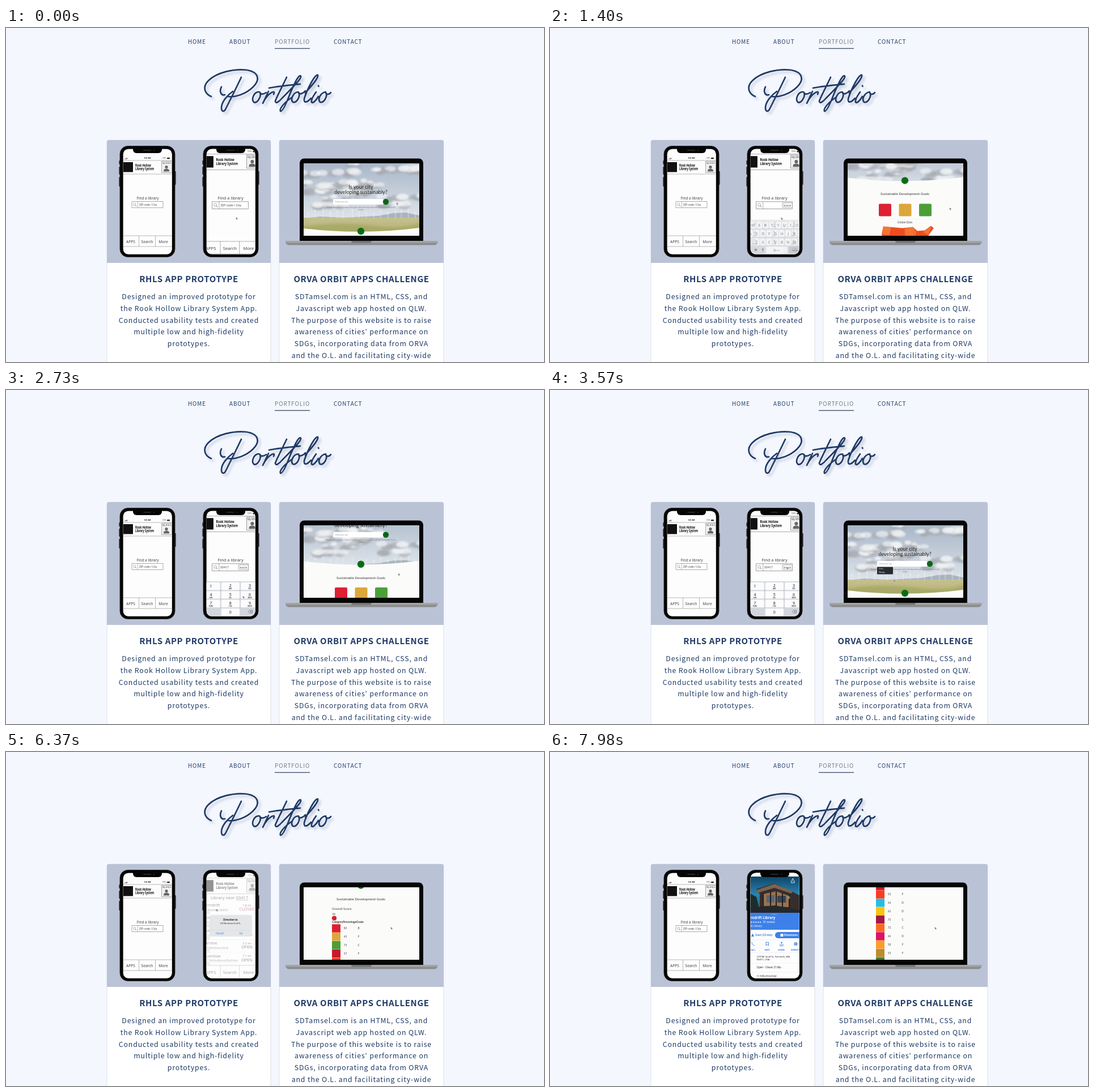
Write an HTML page with a canvas that moves like this. It is 949x590 px and loops after 8000 ms.

```html
<!DOCTYPE html>
<html lang="en">
<head>
<meta charset="utf-8">
<title>Portfolio</title>
<style>
html, body { margin: 0; width: 100%; height: 100%; overflow: hidden; background: #f4f7fe; }
canvas { display: block; }
</style>
</head>
<body>
<canvas id="stage" width="949" height="590"></canvas>
<script>
const LOOP = 8000, STEP = 70;
const NAVY = '#1f3a66', PANEL = '#bac3d6', BLUE = '#3d80ea';
const SOURCE = '"Noto Sans CJK JP", "Noto Sans CJK SC", "Noto Sans CJK", "Open Sans", sans-serif';
const NOTO = '"Noto Sans", sans-serif', LATO = 'Lato, sans-serif';
const ZIP = '00417';
const ctx = document.getElementById('stage').getContext('2d');

const ramp = (t, a, b) => Math.min(1, Math.max(0, (t - a) / (b - a)));

// Linear interpolation through [time, ...values] points.
function track(points, t) {
  let i = 1;
  while (i < points.length - 1 && points[i][0] < t) i++;
  const a = points[i - 1], b = points[i], k = ramp(t, a[0], b[0]);
  return a.slice(1).map((v, j) => v + (b[j + 1] - v) * k);
}

// Draws a line of text and returns its natural width.
function text(s, x, y, size, { color = '#444', align = 'center', weight = 400, font = NOTO, spacing = 0 } = {}) {
  ctx.font = `${weight} ${size}px ${font}`;
  ctx.letterSpacing = spacing + 'px';
  ctx.textAlign = align;
  ctx.fillStyle = color;
  ctx.fillText(s, x, y);
  return ctx.measureText(s).width;
}

function box(x, y, w, h, fill, radius = 0, stroke, width = 0.7) {
  ctx.beginPath();
  ctx.roundRect(x, y, w, h, radius);
  if (fill) { ctx.fillStyle = fill; ctx.fill(); }
  if (stroke) { ctx.strokeStyle = stroke; ctx.lineWidth = width; ctx.stroke(); }
}

function disc(x, y, r, fill) {
  ctx.beginPath();
  ctx.arc(x, y, r, 0, 7);
  ctx.fillStyle = fill;
  ctx.fill();
}

function shape(d, fill) {
  ctx.fillStyle = fill;
  ctx.fill(new Path2D(d));
}

function line(d, color = '#888', width = 0.6) {
  ctx.strokeStyle = color;
  ctx.lineWidth = width;
  ctx.stroke(new Path2D(d));
}

function group(draw, alpha = 1) {
  if (alpha <= 0) return;
  ctx.save();
  ctx.globalAlpha = alpha;
  draw();
  ctx.restore();
}

function pointer(x, y) {
  group(() => {
    ctx.translate(x, y);
    shape('M-1.5-2 L2.5 .8 L.8 1.2 L1.6 3 L.7 3.3 L0 1.6 L-1.2 2.4Z', '#777');
    line('M-1.5-2 L2.5 .8 L.8 1.2 L1.6 3 L.7 3.3 L0 1.6 L-1.2 2.4Z', '#fff', 0.3);
  });
}

/* ---------- page ---------- */

const SCRIPT = [
  'M362 121C350 116 346 104 357 93C372 78 402 72 423 74C446 77 449 91 436 104C424 116 405 123 391 121',
  'M415 87C407 104 396 126 388 142C385 149 380 148 380 141C380 131 390 119 400 112M380 104C376 112 379 120 386 118',
  'M447 113C438 112 432 125 437 131C443 134 451 121 448 114C449 118 455 117 459 114',
  'M463 112C459 120 456 127 453 133C457 124 464 115 471 113C474 112 473 115 472 117',
  'M495 87C487 104 478 121 475 129C475 135 482 130 487 124M464 106C480 103 500 101 519 99',
  'M487 124C502 108 522 90 520 85C516 81 508 100 501 116C495 132 488 148 484 147C482 143 490 132 505 122',
  'M516 113C507 113 501 126 506 131C513 133 520 120 516 114C518 118 524 116 528 111',
  'M528 115C538 103 552 88 550 83C546 80 531 108 526 125C525 134 532 131 538 124',
  'M547 113C542 120 538 128 539 131C541 134 547 128 551 121M551 102L551.5 103',
  'M564 113C555 114 549 126 554 131C561 133 568 120 564 114C565 118 570 118 573 114'
].join('');

function card(x, w, title, lines) {
  const mid = x + w / 2;
  box(x, 198, w, 420, '#fff', 4, '#dce0e9', 1);
  box(x, 198, w, 217, PANEL, [3, 3, 0, 0]);
  text(title, mid, 449, 15, { color: NAVY, weight: 600, font: SOURCE, spacing: 0.6 });
  lines.forEach((s, i) => text(s, mid, 479 + i * 20.8, 12.35, { color: NAVY, font: SOURCE, spacing: 0.85 }));
}

function page() {
  box(0, 0, 949, 590, '#f4f7fe');
  [['HOME', 321], ['ABOUT', 394], ['PORTFOLIO', 474], ['CONTACT', 578]].forEach(([s, x]) =>
    text(s, x, 28, 9.85, { align: 'left', color: s === 'PORTFOLIO' ? '#737b88' : NAVY, font: SOURCE, spacing: 0.95 }));
  box(474, 35.5, 62, 1.5, '#56617a');
  group(() => {
    ctx.lineCap = ctx.lineJoin = 'round';
    ctx.shadowColor = 'rgba(40,55,90,.22)';
    ctx.shadowBlur = 4;
    ctx.shadowOffsetX = ctx.shadowOffsetY = 4;
    line(SCRIPT, NAVY, 2.7);
  });
  card(178, 289, 'RHLS APP PROTOTYPE', [
    'Designed an improved prototype for', 'the Rook Hollow Library System App.',
    'Conducted usability tests and created', 'multiple low and high-fidelity', 'prototypes.']);
  card(482, 290, 'ORVA ORBIT APPS CHALLENGE', [
    'SDTamsel.com is an HTML, CSS, and', 'Javascript web app hosted on QLW.',
    'The purpose of this website is to raise', 'awareness of cities’ performance on',
    'SDGs, incorporating data from ORVA', 'and the O.L. and facilitating city-wide']);
}

/* ---------- phones ---------- */

function phone(x, screen) {
  [[234, 7], [245, 14], [263, 17]].forEach(([y, h]) => box(x - 1.6, y, 2.5, h, '#222', 1));
  box(x + 96, 253, 2.6, 24, '#222', 1);
  box(x, 208.5, 97, 196, '#050505', 14, '#222', 0.8);
  ctx.save();
  box(x + 5.8, 213.8, 85.8, 185.8, '#fdfdfd', 9);
  ctx.clip();
  screen();
  ctx.restore();
  box(x + 23, 210, 51, 11, '#050505', [0, 0, 6, 6]);
  box(x + 41, 215.3, 14, 1.5, '#333', 1);
  disc(x + 60, 216, 1, '#2c3444');
}

function personIcon(x, y) {
  disc(x, y, 2.6, '#666');
  shape(`M${x - 5} ${y + 8}V${y + 6}Q${x - 4} ${y + 3} ${x} ${y + 3}T${x + 5} ${y + 6}V${y + 8}Z`, '#666');
}

function condensed(s, x, y) {
  group(() => {
    ctx.translate(x, y);
    ctx.scale(0.72, 1);
    text(s, 0, 0, 6.2, { align: 'left', weight: 700, color: '#111' });
  });
}

function appFrame() {
  box(200, 215, 100, 190, '#fdfdfd');
  text('9:41 AM', 249.5, 231.3, 2.9, { weight: 700, color: '#222' });
  [0, 1, 2, 3].forEach(i => box(209 + i * 1.3, 231 - i * 0.6, 0.9, 0.7 + i * 0.6, '#333'));
  text('100%', 279, 231.2, 2.7);
  box(284, 229, 5, 2.2, '#222', 0.6);
  line('M200 234H300');
  box(207, 237, 17, 17.5, '#111');
  condensed('Rook Hollow', 228, 244.5);
  condensed('Library System', 228, 251);
  box(274.5, 235.5, 18, 20, '#f1f1f1', 0, '#888');
  text('My RHLS', 283.5, 240.3, 3.8);
  personIcon(283, 245.5);
  line('M200 258H300M200 367H300M200 386H300M234.5 367V386M263.5 367V386');
  [['APPS', 220], ['Search', 249], ['More', 277.5]].forEach(([s, x]) => text(s, x, 379.6, 6.6));
}

function appHome(placeholder = 1) {
  appFrame();
  text('Find a library', 250, 303, 6.4);
  box(222, 306.5, 55, 11, '#fff', 0, '#888');
  line('M232.5 306.5V317.5');
  ctx.beginPath();
  ctx.arc(226.7, 311.4, 2.1, 0, 7);
  ctx.stroke();
  line('M228.2 313L230.2 315', '#555', 0.8);
  group(() => text('ZIP code / City', 235, 313.9, 4.7, { align: 'left' }), placeholder);
}

const zoomed = draw => group(() => {
  ctx.translate(395.5, 225);
  ctx.scale(1.16, 1.16);
  ctx.translate(-249.5, -236);
  draw();
}, ctx.globalAlpha);

const KEY = { color: '#222' };

function letterKeys() {
  box(350, 340, 94, 62, '#d9dbdf');
  [['QWERTYUIOP', 347, 348], ['ASDFGHJKL', 353.5, 363], ['ZXCVBNM', 364.5, 378]].forEach(([keys, x, y]) =>
    [...keys].forEach((c, i) => {
      box(x + i * 11.1 - 4.6, y - 6, 9.3, 12, '#fcfcfc', 1.8);
      text(c, x + i * 11.1, y + 2.6, 7, KEY);
    }));
  box(382, 386, 37, 12, '#fcfcfc', 1.8);
  text('space', 400.5, 393.6, 3.8);
  disc(363, 392, 2.4, '#888');
  box(374.4, 389, 2, 4.5, '#666', 1);
  line('M375.4 393.5V395.6', '#666');
  box(421, 386, 22, 12, '#c2c6cd', 1.8);
  text('return', 432, 393.5, 3.6);
}

function numberKeys() {
  box(350, 338, 94, 64, '#d3d6dc');
  const captions = ['', 'ABC', 'DEF', 'GHI', 'JKL', 'MNO', 'PQRS', 'TUV', 'WXYZ'];
  const key = (s, caption, col, row) => {
    const x = 361.5 + col * 34.3, y = 346.5 + row * 15.4;
    box(x - 16, y - 6.7, 32.2, 13.4, '#fcfcfc', 2);
    text(s, x, y + (caption ? 1.8 : 2.6), 7, KEY);
    text(caption, x, y + 5.6, 2.8, { weight: 700 });
  };
  captions.forEach((c, i) => key(i + 1, c, i % 3, Math.floor(i / 3)));
  key('0', '', 1, 3);
  line('M427 391.5L429.3 389H434.5V394H429.3ZM430.6 390.2L433 392.8M433 390.2L430.6 392.8', '#555');
}

function searchButton() {
  box(410, 308.6, 17.5, 8.6, '#f4f4f4', 0.5, '#888', 0.6);
  text('Search', 418.7, 314.5, 4.2);
}

const LIBRARIES = [
  ['Ferndrift', '218 Northeast Quill St.', '1.8 mi', 'CLOSED'],
  ['Hollmere Beach', '1904 Oatfen Avenue Northeast', '1.9 mi', 'OPEN'],
  ['Lake Brindle Park', '1171 Pellow Way Northeast', '3.9 mi', 'OPEN'],
  ['Tarnive', '6502 Northeast Osk St.', '5.2 mi', 'OPEN'],
  ['Quenlow', '1121 Varrow Avenue Northeast', '7.1 mi', 'OPEN']
];

function underlined(s, x, y, size) {
  const width = text(s, x, y, size, { align: 'left' });
  line(`M${x} ${y + 0.9}h${width}`, '#777', 0.4);
}

function libraryList() {
  zoomed(appFrame);
  text('Library near ' + ZIP, 394, 260, 7.5);
  line('M406 261.6H428', '#555', 0.6);
  LIBRARIES.forEach(([name, street, distance, state], i) => {
    const y = 273 + i * 22.4;
    text(name, 347.8, y, 7.3, { align: 'left' });
    underlined(street, 347.8, y + 6.8, 4.2);
    underlined(ZIP, 347.8, y + 12.2, 4.2);
    text(distance, 425, y - 0.2, 5.3);
    text(state, 425, y + 7.2, 7.3, { color: state === 'CLOSED' ? '#934' : '#333' });
    if (i) line(`M353 ${y - 8.5}H440`, '#ddd', 0.5);
  });
}

function dialog() {
  box(350, 210, 94, 194, 'rgba(253,253,253,.55)');
  box(359, 288, 75, 38, '#e4e6e8', 4);
  line('M359 315H434', '#d2d5d8', 0.5);
  text('Direction to', 396, 297.8, 4.3, { weight: 700, color: '#222' });
  text('218 Northeast Quill St.', 396, 304, 3.5, { color: '#222' });
  text('Cancel', 377, 322.4, 4.5, { color: BLUE });
  text('Go', 414.5, 322.4, 4.5, { color: BLUE });
}

function placePage() {
  box(350, 210, 94, 194, '#fdfdfd');
  const sky = ctx.createLinearGradient(0, 220, 0, 284);
  sky.addColorStop(0, '#0d4567');
  sky.addColorStop(0.5, '#2985b4');
  sky.addColorStop(1, '#325a6b');
  box(353, 220, 87, 64, sky);
  shape('M353 250L364 256L371 284H353Z', '#1e2d29');
  shape('M364 242L396 232L426 246L440 253V284H370V251Z', '#362e2b');
  shape('M364 244L396 233L428 246L426 250L396 240L366 249Z', '#7d6253');
  shape('M376 251L399 246L421 254V274L376 272Z', '#98714f');
  box(382, 253, 14, 13, '#536777');
  box(401, 254, 15, 12, '#364655');
  line('M376 250V280M389 247V280M399 246V280M410 249V280M422 252V282', '#231e1e', 2);
  shape('M353 275L397 271L440 279V284H353Z', '#25282a');
  line('M425.5 226.5V231H431V226.5M428.2 229V223.7M426.3 225.4L428.2 223.5L430.1 225.4', '#fff', 0.8);

  box(353, 284, 87, 30, BLUE);
  box(390, 286, 10, 1, '#7fabf2', 0.5);
  const left = { align: 'left', color: '#fff' };
  text('Ferndrift Library', 346, 295, 6.2, { ...left, weight: 600 });
  text('4.3 ★★★★★  30 reviews', 346, 302.2, 4.4, left);
  text('Public Library', 346, 309.2, 4.4, left);
  shape('M355 326L357.5 320.5L360 326Z', BLUE);
  text('Start (32 min)', 362, 325.3, 4.5, { align: 'left', color: BLUE, weight: 600 });
  box(397, 318, 49, 11, BLUE, 5.5);
  box(406.5, 321, 5, 5, '#fff', 1);
  text('Directions', 413, 325.3, 4.7, { ...left, weight: 600 });
  line('M353 332H440M353 354H440M353 373H440M353 389H440', '#e4e6e9');
  line('M356 336Q356 341 361 342M381 336H385.5V342L383.2 340L381 342ZM406 339V342.5H411V339M408.5 341V335.5M406.8 337L408.5 335.3L410.2 337', BLUE, 0.9);
  disc(433.5, 339, 3, BLUE);
  line('M430.5 339H436.5M433.5 336V342', '#fff', 0.5);
  [['CALL', 358], ['SAVE', 383], ['SHARE', 408], ['WEBSITE', 433]].forEach(([s, x]) =>
    text(s, x, 350.5, 3.7, { color: BLUE, weight: 600 }));
  const info = { align: 'left', color: '#222', weight: 500 };
  text('218 NE Quill St, Ferndrift, WA', 364.5, 363, 4.3, info);
  text(ZIP + ', USA', 364.5, 368, 4.3, info);
  text('Open · Closes 21:00', 364.5, 382.3, 4.5, info);
  line('M404.5 380L406 381.7L407.5 380', '#222', 0.7);
  text('+1 555-010-0142', 364.5, 398.3, 4.5, info);
}

const TAP_PATH = [[0, 407, 336], [500, 404, 316], [1000, 404, 316], [2200, 419, 377], [2590, 419, 377],
  [3360, 419, 314], [5110, 419, 315], [5800, 372, 279], [6450, 372, 279], [6900, 414, 321], [7400, 421, 256]];

function prototypeScreen(t) {
  const keys = ramp(t, 490, 870);
  zoomed(() => appHome(1 - keys));
  group(searchButton, keys);
  group(letterKeys, keys);
  group(numberKeys, ramp(t, 1300, 1610));
  if (t >= 2450) text(ZIP, 378, 315.2, 5.2, { align: 'left' });
  group(libraryList, ramp(t, 3780, 4200));
  group(dialog, ramp(t, 5950, 6300));
  group(placePage, ramp(t, 6950, 7450));
  pointer(...track(TAP_PATH, t));
}

/* ---------- laptop ---------- */

const landscape = (() => {
  const canvas = document.createElement('canvas');
  canvas.width = 204;
  canvas.height = 130;
  const c = canvas.getContext('2d');
  const fade = (y, h, from, to) => {
    const g = c.createLinearGradient(0, y, 0, y + h);
    g.addColorStop(0, from);
    g.addColorStop(1, to);
    c.fillStyle = g;
    c.fillRect(0, y, 204, h);
  };
  let seed = 11;
  const random = () => (seed = seed * 16807 % 2147483647) / 2147483647;
  fade(0, 96, '#a9b7c8', '#dde3e9');
  c.filter = 'blur(1.6px)';
  // Each cloud is a cluster of puffs: grey underneath, bright on top.
  for (let i = 0; i < 26; i++) {
    const x = random() * 204, y = random() * 74, size = 5 + random() * 7;
    for (let j = 0; j < 7; j++) {
      c.fillStyle = j < 4 ? 'rgba(165,170,177,.55)' : 'rgba(241,242,243,.7)';
      c.beginPath();
      c.ellipse(x + (random() - 0.5) * size * 4, y + (j < 4 ? 3 : -1) + random() * 4, size, size * 0.5, 0, 0, 7);
      c.fill();
    }
  }
  c.filter = 'none';
  c.fillStyle = '#a9b4bf';
  c.fill(new Path2D('M0 97L30 94L70 96L130 93L158 88L180 87L204 92V100H0Z'));
  fade(96, 34, '#c5c092', '#b3ae66');
  c.filter = 'blur(2px)';
  c.fillStyle = 'rgba(150,158,84,.5)';
  c.fill(new Path2D('M0 112Q60 102 120 110T204 104V130H0Z'));
  c.filter = 'none';
  c.strokeStyle = '#f1f3f4';
  c.lineWidth = 0.6;
  for (let i = 0; i < 16; i++) {
    const x = 6 + i * 12.7 + random() * 4, y = 82 + random() * 7;
    c.stroke(new Path2D(`M${x} 97V${y}L${x - 2.6} ${y + 1.6}M${x} ${y}L${x + 2.6} ${y + 1}M${x} ${y}V${y - 3.4}`));
  }
  return canvas;
})();

const SCROLL = [[0, 0], [770, 49], [1500, 96], [1900, 104], [2310, 89], [3300, 0], [4800, 0], [6370, 123.5], [7980, 242.7]];
const MOUSE = [[0, 690, 310], [700, 706, 319], [2600, 706, 319], [3400, 628, 359], [3700, 592, 320],
  [4100, 592, 308], [4500, 628, 359], [5400, 680, 311], [8000, 680, 311]];
const GOAL_COLORS = ['#dd2033', '#dda63a', '#4c9f38', '#c5192d', '#ff3a21', '#26bde2', '#fcc30b', '#a21942', '#fd6925', '#dd1367', '#fd9d24', '#bf8b2e', '#3f7e44'];
const SCORES = '83B 45F 73C 57F 53F 66D 62D 73C 72C 66D 58F 53F 61D'.split(' ');

function hero(scroll, t) {
  group(() => {
    ctx.clip(new Path2D('M525 239H729V353Q627 366 525 354Z'));
    ctx.drawImage(landscape, 525, 239 + scroll * 0.5);
  });
  const dark = { font: LATO, color: '#222' };
  text('Is your city', 626, 284, 9, dark);
  text('developing sustainably?', 626, 293, 9, dark);
  box(577, 302, 89, 10, '#fff', 2);
  text(t > 4200 && t < 5000 ? 'Vellen' : 'Enter your city', 581, 308.3, 3.2, { align: 'left', color: '#888' });
  disc(670, 307, 5.2, '#0b6917');
  line('M669 306.4H671.4M670.2 305.2V308.2', '#053e0a');
  const tiny = { font: LATO, color: '#777' };
  text('Discover how your city is doing on the goals, and see the steps that could help it to do better for all', 626, 317.6, 2.8, tiny);
  text('in years', 626, 321.6, 2.8, tiny);
  if (t >= 3400 && t < 4130) {
    box(577, 312.5, 28, 13, '#272a2f', 0.8);
    text('Vellen', 580, 317.3, 2.8, { align: 'left', color: '#ddd' });
    text('Manage', 580, 323, 2.8, { align: 'left', color: '#fff' });
  }
  if (t >= 4200 && t < 4800) {
    box(589, 299, 28, 6.3, '#272a2f', 0.8);
    text('Cut  Copy  Paste', 603, 303.2, 2.8, { color: '#ddd' });
  }
  disc(626, 359, 6.2, '#0b6f15');
  line('M624 358.5L626 360.5L628 358.5', '#064a0b', 0.7);
}

function globalData() {
  [580, 615.5, 651].forEach((x, i) => box(x, 400, 22, 22, GOAL_COLORS[i], 2));
  for (let x = 602; x < 652; x += 3) disc(x, 427, 0.4, '#bbb');
  text('Global Data', 626, 434.5, 5, { font: LATO });
  shape('M588 440L622 443L640 441L648 448L661 447L672 439L677 443L668 455L666 467L657 477L663 492L655 487L648 481L633 483L626 493L616 483L600 480L589 469L585 454Z', '#ee4d22');
  shape('M588 440L602 442L599 455L585 454ZM625 444L640 441L646 450L641 466L626 464ZM658 450L672 440L668 455Z', '#f57535');
  line('M602 442L599 478M613 443V482M626 444V486M586 457L667 460M592 471L660 473M642 447L640 482M653 449L651 482', '#d93c1b', 0.5);
}

function results() {
  const left = { font: LATO, align: 'left' };
  text('Overall Score', 575, 402.5, 5.9, left);
  text('66', 575.5, 411, 4.8, left);
  disc(579, 417, 4.1, '#d3222f');
  text('CategoryPercentageGrade', 575, 425.3, 4.8, { ...left, weight: 600, color: '#222' });
  SCORES.forEach((s, i) => {
    const y = 435 + i * 14.8;
    box(575, y - 7.2, 15, 14.4, GOAL_COLORS[i]);
    text(s.slice(0, 2), 598.5, y + 1.7, 4.8, { font: LATO });
    text(s[2], 622, y + 1.7, 4.8, { font: LATO });
  });
}

function laptop(t) {
  const [scroll] = track(SCROLL, t);
  box(518, 230.5, 218, 147, '#050505', [8, 8, 0, 0]);
  box(525, 239, 204, 128, '#fbfcfa');
  group(() => {
    ctx.clip(new Path2D('M525 239H729V367H525Z'));
    group(() => {
      ctx.translate(0, -scroll);
      hero(scroll, t);
      text('Sustainable Development Goals', 626, 385, 6.2, { font: LATO, color: '#333' });
      if (t < 4800) globalData(); else results();
    });
    pointer(...track(MOUSE, t));
  });
  box(493, 376, 268.5, 7.5, '#8b8c8e', [1, 1, 6, 6]);
  box(493, 376, 268.5, 3.5, '#a3a4a5', 1);
  box(609, 376, 36, 3.6, '#737577', [0, 0, 3, 3]);
}

function frame(now) {
  const t = Math.floor((now % LOOP) / STEP) * STEP;
  page();
  phone(201, appHome);
  phone(348, () => prototypeScreen(t));
  laptop(t);
  requestAnimationFrame(frame);
}
requestAnimationFrame(frame);
</script>
</body>
</html>
```
